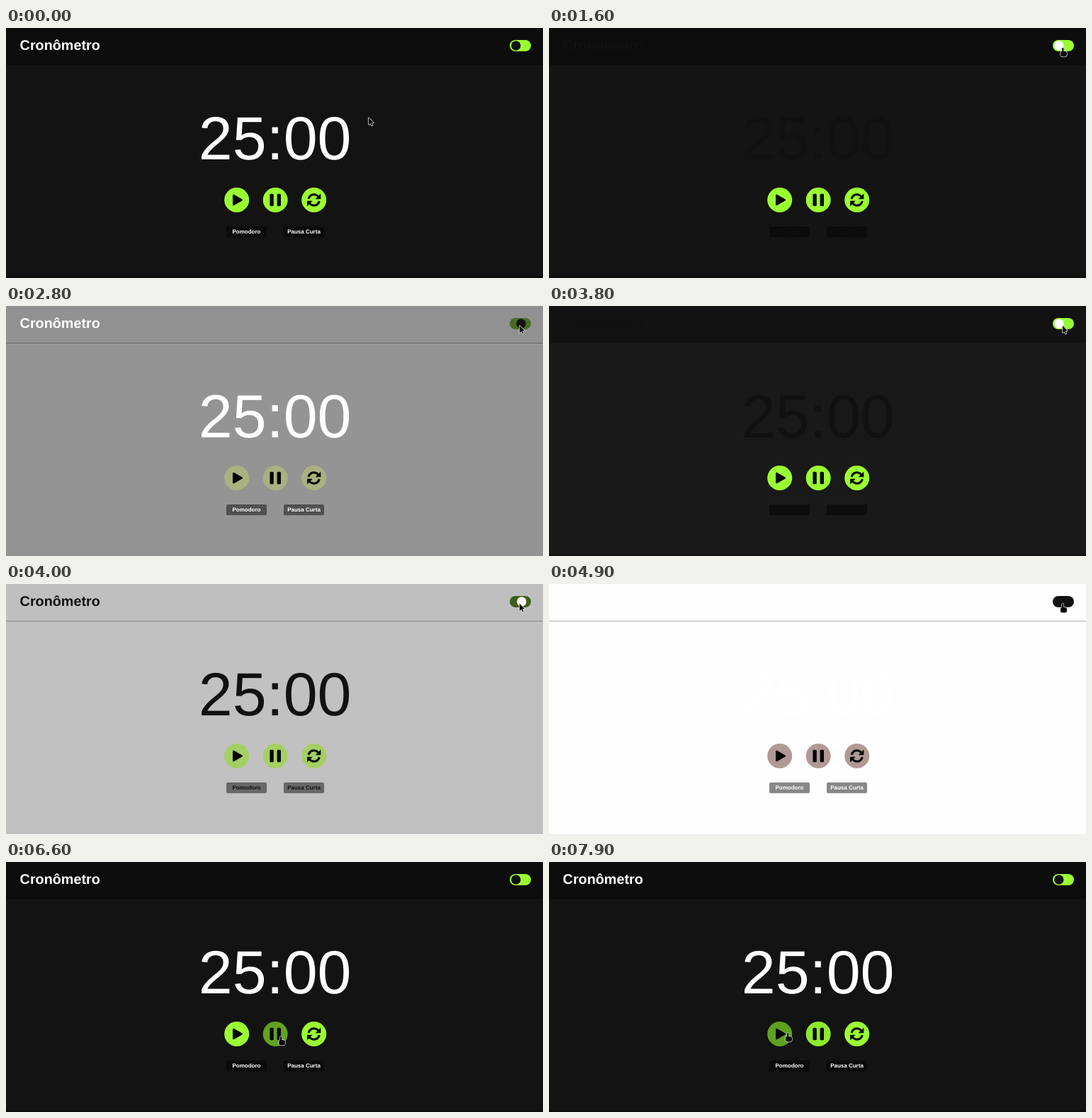
Write an HTML page with a canvas that moves like this. It is 758 by 354 pixels and loops after 8 s.

```html
<!DOCTYPE html>
<html lang="pt">
<head>
<meta charset="utf-8">
<title>Cronômetro</title>
<style>
html, body { margin: 0; width: 100%; height: 100%; overflow: hidden; background: #131313; }
canvas { display: block; }
</style>
</head>
<body>
<canvas id="stage" width="758" height="354"></canvas>
<script>
const ctx = document.getElementById('stage').getContext('2d');
const LOOP = 8000, STEP = 100;
const FONT = '"Liberation Sans", Arial, sans-serif';

const clicks = [
  { at: 1595, speed: 0.75 }, { at: 2665, speed: 1 },
  { at: 3780, speed: 1 }, { at: 4895, speed: 1 }
];

// cursor moves: start, end, destination
const moves = [
  [0, 100, 533, 118], [250, 1100, 725, 28], [5400, 5700, 485, 128],
  [5700, 6000, 329, 190], [6000, 6600, 388, 247], [7400, 7700, 337, 242]
];

const GREEN = [154, 255, 51], ROSE = [176, 154, 150];
const gray = v => [v, v, v];
const mix = (a, b, k) => a.map((v, i) => v + (b[i] - v) * k);
const rgb = c => `rgb(${c.map(Math.round).join(',')})`;
const clamp = v => Math.min(1, Math.max(0, v));
const smooth = x => clamp(x) ** 2 * (3 - 2 * clamp(x));

// CSS "ease": cubic-bezier(.25, .1, .25, 1)
function ease(x) {
  if (x <= 0 || x >= 1) return clamp(x);
  const bez = (a, b, s) => 3 * a * s * (1 - s) ** 2 + 3 * b * s * s * (1 - s) + s ** 3;
  let lo = 0, hi = 1;
  for (let i = 0; i < 24; i++) {
    const m = (lo + hi) / 2;
    if (bez(0.25, 0.25, m) < x) lo = m; else hi = m;
  }
  return bez(0.1, 1, lo);
}

function themeAt(t) {
  const past = clicks.filter(c => c.at <= t);
  const light = past.length % 2 === 1;
  const last = past.pop() || { at: -LOOP, speed: 1 };
  const since = t - last.at;
  const level = (ms, curve = ease) => {
    const p = curve(since * last.speed / ms);
    return light ? p : 1 - p;
  };
  return { light, since, level };
}

function cursorAt(t) {
  let x = 512, y = 127;
  for (const [from, to, tx, ty] of moves) {
    const k = smooth((t - from) / (to - from));
    x += (tx - x) * k;
    y += (ty - y) * k;
  }
  return [x, y];
}

function box(x, y, w, h, r, color) {
  ctx.fillStyle = color;
  ctx.beginPath();
  ctx.roundRect(x, y, w, h, r);
  ctx.fill();
}

function disc(x, y, r, color) {
  ctx.fillStyle = color;
  ctx.beginPath();
  ctx.arc(x, y, r, 0, Math.PI * 2);
  ctx.fill();
}

function label(str, x, y, font, color, align = 'center') {
  ctx.textRendering = 'geometricPrecision';
  ctx.font = `${font} ${FONT}`;
  ctx.textAlign = align;
  ctx.fillStyle = color;
  ctx.fillText(str, x, y);
}

function poly(points) {
  ctx.beginPath();
  points.forEach(([x, y]) => ctx.lineTo(x, y));
  ctx.closePath();
}

function playIcon() {
  ctx.lineJoin = 'round';
  ctx.lineWidth = 2.4;
  poly([[-4.5, -6.6], [7.2, 0], [-4.5, 6.6]]);
  ctx.fill();
  ctx.stroke();
}

function pauseIcon() {
  for (const x of [-7.8, 2.4]) box(x, -8.7, 5.4, 17.4, 1.5, '#050505');
}

function syncIcon() {
  ctx.lineWidth = 3.1;
  for (let i = 0; i < 2; i++) {
    ctx.beginPath();
    ctx.arc(0, 0, 7.8, Math.PI * 1.07, Math.PI * 1.8);
    ctx.stroke();
    poly([[9.6, -9], [9.6, -1.2], [2, -1.2]]);
    ctx.fill();
    ctx.rotate(Math.PI);
  }
}

const buttons = [playIcon, pauseIcon, syncIcon].map((icon, i) => ({ icon, x: 325.7 + 54.5 * i }));

function drawButton({ icon, x }, color) {
  disc(x, 243.5, 17.5, rgb(color));
  ctx.save();
  ctx.translate(x, 243.5);
  ctx.fillStyle = ctx.strokeStyle = '#050505';
  icon();
  ctx.restore();
}

function drawCursor(x, y, hand) {
  ctx.save();
  ctx.translate(x, y);
  ctx.lineJoin = 'round';
  ctx.lineWidth = 1.4;
  if (hand) {
    ctx.beginPath();
    ctx.roundRect(-1, 0, 2.4, 9, 1.2);
    ctx.roundRect(-3, 5, 9, 7.5, 3);
  } else {
    poly([[0, 0], [0, 10], [2.3, 8], [4, 11.5], [5.6, 10.8], [4, 7.3], [7, 7]]);
  }
  ctx.fillStyle = '#0a0a0a';
  ctx.strokeStyle = '#e0e0e0';
  ctx.stroke();
  ctx.fill();
  ctx.restore();
}

function draw(t) {
  const { light, since, level } = themeAt(t);
  const bg = level(500), slide = level(560), tint = level(450, smooth);
  const ink = light ? '#111111' : '#ffffff';
  const fade = (dark, lit) => rgb(mix(gray(dark), gray(lit), bg));

  box(0, 0, 758, 354, 0, fade(19, 255));
  box(0, 351, 758, 3, 0, fade(13, 255));
  box(0, 0, 758, 52, 0, fade(12, 255));
  box(0, 52, 758, 1, 0, fade(15, 176));

  label('Cronômetro', 19.6, 30.7, 'bold 19.8px', ink, 'left');
  label('25:00', 379.7, 185.7, '86.2px', ink);

  box(711, 17, 30, 16, 8, rgb(mix(GREEN, gray(17), slide)));
  disc(719.8 + 12 * slide, 25, 6.7, light ? '#ffffff' : '#111111');

  const base = mix(GREEN, ROSE, tint);
  const fadeIn = from => ease((t - from) / 800);
  const hover = [fadeIn(7540), fadeIn(6250) - fadeIn(7480), 0];
  buttons.forEach((b, i) => drawButton(b, mix(base, gray(0), hover[i] / 2)));

  ['Pomodoro', 'Pausa Curta'].forEach((name, i) => {
    const left = 311 + 81 * i;
    box(left, 281, 57, 15.3, 2, fade(11, 136));
    label(name, left + 28.5, 291.4, 'bold 8px', ink);
  });

  const [x, y] = cursorAt(t);
  const onToggle = t >= 1200 && t <= 5400 && (since < 10 || since > 500);
  const onButton = buttons.some(b => Math.hypot(x - b.x, y - 243.5) < 17.5);
  drawCursor(x, y, onToggle || onButton);
}

const begin = performance.now();
function tick() {
  const t = (performance.now() - begin) % LOOP;
  draw(Math.floor(t / STEP) * STEP);
  requestAnimationFrame(tick);
}
tick();
</script>
</body>
</html>
```
